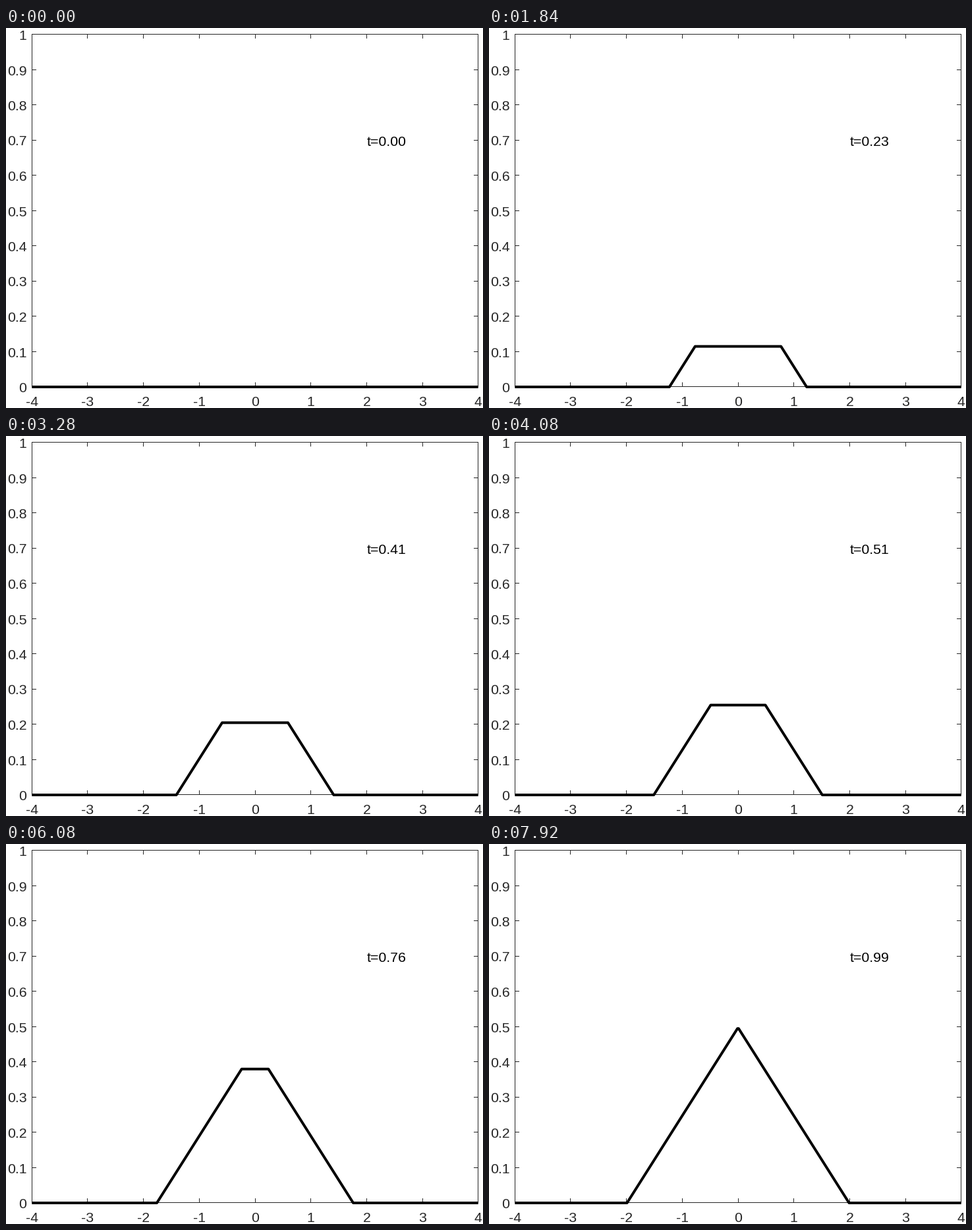
These frames come from a looping animation (724x577 px, 8000 ms). A matplotlib script:

```python
import math

import matplotlib.pyplot as plt
from matplotlib.animation import FuncAnimation

WIDTH, HEIGHT, DPI = 724, 577, 100
FRAMES, INTERVAL = 100, 80
PT = 72 / DPI  # points per pixel

CENTER_X, UNIT_X = 378, 84.68
BASE_Y, UNIT_Y = 545, 535
TICK = 6
AXIS_COLOR = "#262626"

plt.rcParams["font.family"] = "Liberation Sans"

fig = plt.figure(figsize=(WIDTH / DPI, HEIGHT / DPI), dpi=DPI, facecolor="white")
ax = fig.add_axes([0, 0, 1, 1])
ax.set_xlim(0, WIDTH)
ax.set_ylim(HEIGHT, 0)
ax.axis("off")


def px(x):
    return CENTER_X + UNIT_X * x


def py(y):
    return BASE_Y - UNIT_Y * y


def column(x):
    """Centre of the pixel column holding x."""
    return math.floor(px(x)) + 0.5


def row(y):
    """Centre of the pixel row just above y."""
    return math.ceil(py(y) - 1e-6) - 0.5


def thin(xs, ys):
    ax.plot(xs, ys, color=AXIS_COLOR, lw=PT, snap=False,
            solid_capstyle="projecting", solid_joinstyle="miter")


def label(x, y, text, ha, color=AXIS_COLOR):
    return ax.text(x, y, text, ha=ha, va="baseline", color=color,
                   fontsize=21.33 * PT)


left, right, top, bottom = column(-4), column(4), row(1), row(0)
thin([left, right, right, left, left], [top, top, bottom, bottom, top])

for x in range(-4, 5):
    cx = column(x)
    thin([cx, cx], [bottom, bottom - TICK])
    thin([cx, cx], [top, top + TICK])
    label(px(x), 574, f"{x}", "center")

for k in range(11):
    cy = row(k / 10)
    thin([left, left + TICK], [cy, cy])
    thin([right, right - TICK], [cy, cy])
    label(31.5, round(py(k / 10) + 8), f"{k / 10:g}", "right")

wave, = ax.plot([], [], color="black", lw=4 * PT, snap=False,
                solid_capstyle="butt", solid_joinstyle="round", zorder=3)
clock = label(px(2), 179, "", "left", "black")


def update(i):
    t = i / FRAMES
    # Two half-height slopes spread from x = -1 and x = 1 at unit speed.
    xs = [-4, -1 - t, -1 + t, 1 - t, 1 + t, 4]
    ys = [0, 0, t / 2, t / 2, 0, 0]
    wave.set_data([px(x) for x in xs], [py(y) for y in ys])
    clock.set_text(f"t={t:.2f}")
    return wave, clock


anim = FuncAnimation(fig, update, frames=FRAMES, interval=INTERVAL,
                     repeat=True, repeat_delay=0)
plt.show()
```
